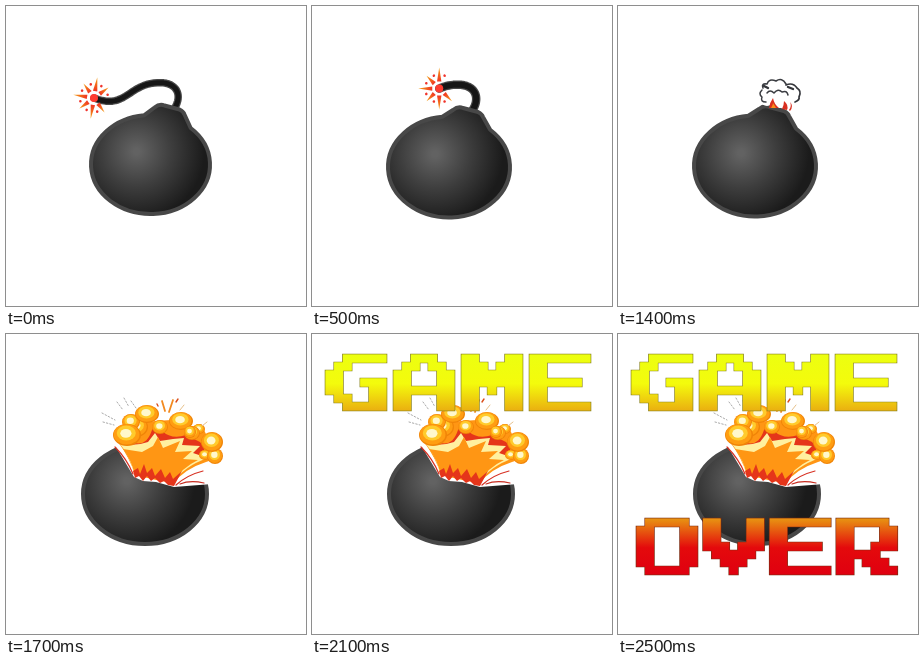
These frames come from a looping animation (300x300 px, 2600 ms). An HTML page with a canvas:

```html
<!DOCTYPE html>
<html lang="en">
<head>
<meta charset="utf-8">
<title>Game over</title>
<style>
html, body { margin: 0; width: 100%; height: 100%; overflow: hidden; background: #fff; }
canvas { display: block; width: 300px; height: 300px; }
</style>
</head>
<body>
<canvas id="stage" width="300" height="300" role="img" aria-label="GAME OVER"></canvas>
<script>
const ctx = document.getElementById('stage').getContext('2d');
const LOOP = 2600, STEP = 100, TAU = Math.PI * 2;

// 7 x 7 pixel letters, one row per string
const GLYPHS = {
  G: ['..#####', '.##....', '##.....', '##..###', '##...##', '.##..##', '..#####'],
  A: ['..###..', '.##.##.', '##...##', '##...##', '#######', '##...##', '##...##'],
  M: ['##...##', '###.###', '#######', '#######', '##.#.##', '##...##', '##...##'],
  E: ['#######', '##.....', '##.....', '######.', '##.....', '##.....', '#######'],
  O: ['.#####.', '##...##', '##...##', '##...##', '##...##', '##...##', '.#####.'],
  V: ['##...##', '##...##', '##...##', '###.###', '.#####.', '..###..', '...#...'],
  R: ['######.', '##...##', '##...##', '##..###', '#####..', '##.###.', '##..###']
};

function shape(points, fill) {
  ctx.beginPath();
  points.forEach(([x, y]) => ctx.lineTo(x, y));
  ctx.closePath();
  ctx.fillStyle = fill;
  ctx.fill();
}

function disc(x, y, r, fill) {
  ctx.beginPath();
  ctx.arc(x, y, r, 0, TAU);
  ctx.fillStyle = fill;
  ctx.fill();
}

function curve(d, color, width) {
  ctx.strokeStyle = color;
  ctx.lineWidth = width;
  ctx.stroke(new Path2D(d));
}

function fill(d, color) {
  ctx.fillStyle = color;
  ctx.fill(new Path2D(d));
}

function metal(x, y) {
  const g = ctx.createRadialGradient(x, y, 3, x, y, 68);
  g.addColorStop(0, '#626262');
  g.addColorStop(0.5, '#3d3d3d');
  g.addColorStop(1, '#1b1b1b');
  return g;
}

function paintBody(path, x, y) {
  ctx.fillStyle = metal(x, y);
  ctx.fill(path);
  ctx.strokeStyle = '#484848';
  ctx.lineWidth = 4;
  ctx.lineJoin = 'round';
  ctx.stroke(path);
}

function bomb(k) {
  const [cx, cy, rx, ry] = k ? [137, k < 7 ? 161 : 160, 61, 50.5] : [144.5, 158.5, 59.5, 49.5];
  const p = new Path2D();
  p.ellipse(cx, cy, rx, ry, 0, -0.83, TAU - 1.68);
  p.lineTo(cx + 4, cy - 57);
  p.quadraticCurveTo(cx + 9, cy - 61, cx + 14, cy - 59);
  p.lineTo(cx + 29, cy - 55);
  p.quadraticCurveTo(cx + 33, cy - 53, cx + 34, cy - 50);
  p.closePath();
  paintBody(p, cx - 14, cy - 13);
}

const bezier = (a, b, c, d, t) =>
  a * (1 - t) ** 3 + 3 * b * t * (1 - t) ** 2 + 3 * c * t * t * (1 - t) + d * t ** 3;

// u runs from the free end (0) to the cap (2)
function fusePoint(u) {
  return u < 1
    ? [bezier(88, 118, 122, 148, u), bezier(92, 104, 80, 77, u)]
    : [bezier(148, 172, 177, 168, u - 1), bezier(77, 74, 90, 103, u - 1)];
}

function fuse(u, width) {
  ctx.lineCap = 'round';
  for (const [color, w] of [['#484848', width], ['#161616', width - 2.5]]) {
    ctx.beginPath();
    for (let i = 0; i <= 40; i++) ctx.lineTo(...fusePoint(u + (2 - u) * i / 40));
    ctx.strokeStyle = color;
    ctx.lineWidth = w;
    ctx.stroke();
  }
}

function spark(u, k) {
  const [x, y] = fusePoint(u);
  const [nx, ny] = fusePoint(Math.min(2, u + 0.15));
  const back = u > 1.9 ? Math.PI / 2 : Math.atan2(ny - y, nx - x);
  ctx.save();
  ctx.translate(x, y);
  for (let i = 0; i < 8; i++) {
    const a = i * TAU / 8 + (k ? 0 : 0.16);
    if (Math.cos(a - back) > 0.82) continue;
    ctx.save();
    ctx.rotate(a);
    const len = i % 2 ? 18 : 21;
    const g = ctx.createLinearGradient(6, 0, len, 0);
    g.addColorStop(0, '#f02b25');
    g.addColorStop(1, '#f5a413');
    shape([[7, -2.2], [len, 0], [7, 2.2]], g);
    ctx.rotate(TAU / 16);
    disc(14, 0, 1.3, '#f0342c');
    ctx.restore();
  }
  disc(0, 0, 4, '#ff3b30');
  ctx.restore();
}

function litBomb(k) {
  const u = Math.min(2, 0.139 * k + 0.0046 * k * k);
  const shifted = (paint) => {
    ctx.save();
    if (k) ctx.translate(-8, k < 7 ? 2 : 1);
    paint();
    ctx.restore();
  };
  shifted(() => fuse(u, k ? 8.5 : 7.5));
  bomb(k);
  shifted(() => spark(u, k));
}

function smoke(size) {
  ctx.save();
  ctx.translate(161, 104);
  ctx.scale(size, size);
  ctx.translate(-161, -104);
  for (const [x, y, r] of [[149, 86, 7], [155, 80, 7], [164, 79, 6], [174, 86, 8], [177, 93, 5], [161, 91, 11], [149, 94, 6]])
    disc(x, y, r, '#fff');
  ctx.lineCap = 'round';
  curve('M145 82Q143 77 149 78Q151 72 158 75Q164 71 168 78', '#3b3d42', 1.6);
  curve('M168 79Q175 76 179 82Q184 85 181 91Q182 94 177 96', '#33353a', 1.7);
  curve('M144 84Q140 88 144 91Q142 96 148 96M149 87Q152 83 156 87Q160 82 164 86Q169 84 170 89', '#3b3d42', 1.5);
  curve('M170 81L175 83M146 80L150 82', '#33353a', 2.4);
  fill('M151 102Q152 96 155 92Q156 98 161 102ZM164 103Q166 99 166 95Q171 99 169 104ZM171 104Q174 100 172 96Q176 100 172 105Z', '#d93021');
  fill('M153 102Q155 99 155 97Q157 100 158 102Z', '#fa8c19');
  ctx.restore();
}

function puff(x, y, rx, ry = rx) {
  const oval = (dx, dy, s, color) => {
    ctx.beginPath();
    ctx.ellipse(x + dx * rx, y + dy * ry, rx * s, ry * s, 0, 0, TAU);
    ctx.fillStyle = color;
    ctx.fill();
  };
  oval(0, 0, 1, '#f08408');
  oval(-0.03, -0.05, 0.92, '#ff9d12');
  oval(-0.05, -0.18, 0.68, '#ffcb2c');
  oval(-0.08, -0.15, 0.4, '#fff8cc');
}

function blast(size) {
  const p = new Path2D();
  p.ellipse(139, 160, 62, 50, 0, 0, TAU);
  paintBody(p, 121, 147);
  shape([[104, 104], [110, 113], [128, 143], [137, 147], [150, 148], [168, 153], [206, 150], [206, 100], [140, 96]], '#fff');

  ctx.save();
  ctx.translate(150, 149);
  ctx.scale(size, size);
  ctx.translate(-150, -149);
  ctx.lineCap = 'round';
  // fan of flame, from the outer mass to the red tips at the crater
  fill('M112 108Q124 124 129 141L150 143L167 150Q178 135 200 128L212 124L198 96L165 86L135 88Z', '#ff9614');
  fill('M126 108Q140 114 146 96Q150 89 156 97Q166 106 180 101L194 108Q202 116 196 126Q176 132 128 120Z', '#e5351a');
  fill('M113 109Q128 113 142 108L149 99L154 107L167 105L178 104L176 111L194 112L187 119L202 124Q178 132 167 149L128 140Q124 121 113 109Z', '#fff0a0');
  fill('M117 115L136 118L147 112L152 103L157 114L174 107L169 118L186 117L177 125L192 126Q175 134 167 149L150 146L129 141Q125 125 117 115Z', '#ff9614');
  fill('M127 137L132 134L134 140L138 130L141 139L146 134L149 142L155 135L159 144L164 138L167 145L176 137L168 152L162 151L158 147L154 149L149 144L145 147L141 142L137 147L133 142L129 144Z', '#e5351a');
  curve('M170 151Q181 141 197 137M109 113Q121 125 127 140', '#d73022', 1.2);
  curve('M174 150Q184 146 198 149', '#c62c20', 1.2);

  puff(193, 95, 6, 5);
  puff(199, 121, 6, 5);
  puff(209, 122, 8);
  puff(206, 108, 11, 10);
  puff(186, 99, 8, 7);
  puff(175, 87, 12, 9);
  puff(184, 98, 6);
  puff(131, 93, 11, 10);
  puff(125, 88, 9, 8);
  puff(141, 80, 12, 9);
  puff(154, 93, 8, 7);
  puff(121, 101, 14, 11);

  curve('M156 67L159 77M167 66L163 78', '#f28a20', 1.8);
  curve('M151 70L152 72M172 65L170 68', '#d94d1a', 1.4);
  ctx.setLineDash([1.5, 2]);
  curve('M96 79L109 86M97 88L108 91M111 68L117 76M118 64L123 73M125 67L130 74', '#aaa', 1);
  ctx.setLineDash([]);
  curve('M174 76L178 71M196 92L201 88', '#e7c18b', 1);
  ctx.restore();
}

function letter(char, x, y, [top, middle, bottom, edge]) {
  const w = 61 / 7, h = 56 / 7;
  const cells = new Path2D();
  GLYPHS[char].forEach((row, r) => [...row].forEach((c, i) => {
    if (c === '#') cells.rect(x + i * w, y + r * h, w, h);
  }));
  const g = ctx.createLinearGradient(0, y, 0, y + 56);
  g.addColorStop(0, top);
  g.addColorStop(0.52, middle);
  g.addColorStop(1, bottom);
  ctx.lineJoin = 'miter';
  ctx.strokeStyle = edge;
  ctx.lineWidth = 1.6;
  ctx.stroke(cells);
  ctx.fillStyle = g;
  ctx.fill(cells);
  // hide the seams between cells
  ctx.save();
  ctx.clip(cells);
  ctx.fillRect(x, y, 61, 56);
  ctx.restore();
}

function word(text, x, y, pitch, count, colors) {
  [...text].slice(0, Math.max(0, count)).forEach((c, i) => letter(c, x + i * pitch, y, colors));
}

function draw(k) {
  ctx.fillStyle = '#fff';
  ctx.fillRect(0, 0, 300, 300);
  if (k < 13) litBomb(k);
  else if (k < 16) {
    bomb(k);
    smoke([0.7, 1, 1.25][k - 13]);
  } else blast(k < 17 ? 0.8 : 1);
  word('GAME', 13.5, 20.5, 68, k - 17, ['#ecff10', '#f4fb0c', '#eab010', '#8a8420']);
  word('OVER', 18.5, 184.5, 66.6, k - 21, ['#e89412', '#e40a0c', '#e00010', '#7c2a10']);
}

const start = performance.now();
function tick() {
  draw(Math.floor((performance.now() - start) % LOOP / STEP));
  requestAnimationFrame(tick);
}
tick();
</script>
</body>
</html>
```
